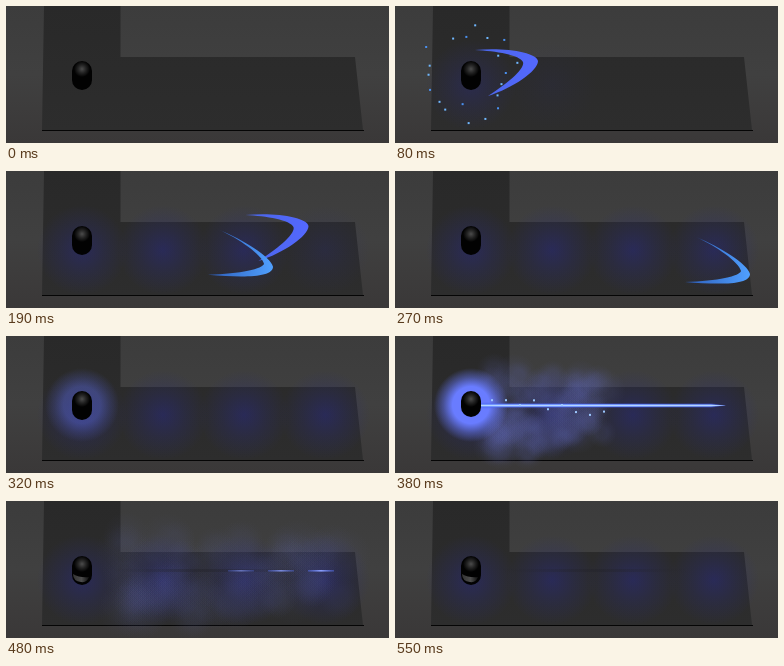
An HTML page with a canvas that plays this animation: 383x137 px, repeating every 690 ms.

```html
<!DOCTYPE html>
<html>
<head>
<meta charset="utf-8">
<style>
html, body { margin: 0; height: 100%; overflow: hidden; background: #3c3c3c; }
canvas { display: block; }
</style>
</head>
<body>
<canvas id="stage" width="383" height="137"></canvas>
<script>
const ctx = document.getElementById('stage').getContext('2d');
const LOOP = 690, BEAM_START = 350, BEAM_PEAK = 380, BEAM_END = 530;
const clamp = v => Math.max(0, Math.min(1, v));
const rand = n => { const v = Math.sin(n * 127.1 + 3.7) * 43758.5453; return v - Math.floor(v); };

// Poses are held: 30 and 50 ms in turn at first, then 50 ms each during the beam.
function hold(t) {
  if (t < BEAM_START) return t - t % 80 + (t % 80 < 30 ? 0 : 30);
  const step = BEAM_PEAK + 50 * Math.floor((t - BEAM_PEAK) / 50);
  return Math.max(BEAM_START, Math.min(BEAM_END, step));
}

function linear(x0, y0, x1, y1, colors) {
  const g = ctx.createLinearGradient(x0, y0, x1, y1);
  colors.forEach((c, i) => g.addColorStop(i / (colors.length - 1), c));
  return g;
}

function glow(x, y, r, rgb, alpha, core = 0) {
  const g = ctx.createRadialGradient(x, y, 0, x, y, r);
  g.addColorStop(0, `rgba(${rgb},${alpha})`);
  g.addColorStop(core, `rgba(${rgb},${alpha})`);
  g.addColorStop((1 + core) / 2, `rgba(${rgb},${alpha * 0.45})`);
  g.addColorStop(1, `rgba(${rgb},0)`);
  ctx.fillStyle = g;
  ctx.fillRect(x - r, y - r, 2 * r, 2 * r);
}

function room() {
  ctx.fillStyle = linear(0, 0, 0, 137, ['#3c3c3c', '#404040', '#3a3838']);
  ctx.fillRect(0, 0, 383, 137);
  ctx.fillStyle = linear(0, 0, 0, 124, ['#292929', '#2b2b2b', '#2d2d2d']);
  ctx.fill(new Path2D('M38 0H114.5V51H349L357 124H36Z'));
  ctx.fillStyle = '#050505';
  ctx.fillRect(36, 124, 322, 1);
}

function lamps(t) {
  for (let i = 0; i < 4; i++) {
    const on = clamp((t - 20 - i * 45) / 80);
    if (on) glow(76 + i * 81, 79, 45, '40,42,135', 0.48 * on);
  }
}

const RISING = new Path2D('M-63-11C-35-14-1-9 0 0C0 10-25 27-50 35C-27 20-13 7-15 1C-18-6-42-10-63-11Z');
const FALLING = new Path2D('M-54-37C-30-27-2-10 0 0C0 11-30 11-65 8C-32 7-10 2-9-3C-11-12-34-28-54-37Z');

function blade(path, x, y, colors) {
  ctx.save();
  ctx.translate(x, y);
  ctx.fillStyle = linear(-60, 0, 0, 0, colors);
  ctx.fill(path);
  ctx.restore();
}

function blades(t) {
  if (t >= 30 && t < 240) blade(RISING, 143 + (t - 80) * 1.45, 55, ['#4a66e8', '#5468ff']);
  if (t >= 110 && t < 320) blade(FALLING, 234 + (t - 160) * 1.1, 93 + (t - 160) * 0.09, ['#2f62c0', '#50a0ff']);
}

function sparks(t) {
  if (t < 30 || t > 160) return;
  const u = t - 30, pull = 1.2 - 0.00266 * u - 0.0000269 * u * u;
  for (let i = 0; i < 20; i++) {
    const angle = i * 2.4, r = (32 + 20 * rand(i)) * pull;
    ctx.fillStyle = i % 3 ? '#70b8ff' : '#4a90f0';
    ctx.fillRect(75 + r * Math.cos(angle), 66 + r * Math.sin(angle), 2, 2);
  }
}

function smoke(t) {
  if (t < BEAM_START || t >= BEAM_END) return;
  const age = (t - BEAM_PEAK) / 100, alpha = 0.15 * clamp(1 - 0.6 * Math.abs(age));
  for (let i = 0; i < 70; i++) {
    const a = rand(i) ** 1.4, r = 12 + 12 * rand(i + 140);
    const x = 98 + a * 112 + age * (20 + 110 * a);
    const y = 76 + (rand(i + 70) - 0.5) * (88 - 24 * a);
    glow(x, y, r + 6 * clamp(age), '88,95,168', alpha, 0.4);
  }
}

function flare(t) {
  const power = t < BEAM_PEAK ? (t - 290) / 90 : 1 - (t - BEAM_PEAK) / 90;
  if (power > 0) glow(76, 69, 37, '105,124,255', power, 0.5);
}

function streak(x0, x1, half, color) {
  ctx.fillStyle = color;
  ctx.beginPath();
  ctx.moveTo(x0, 69.5 - half);
  ctx.lineTo(x1 - 15, 69.5 - half * 0.8);
  ctx.lineTo(x1, 69.5);
  ctx.lineTo(x1 - 15, 69.5 + half * 0.8);
  ctx.lineTo(x0, 69.5 + half);
  ctx.fill();
}

function beam(t) {
  if (t < BEAM_START) return;
  if (t >= 480) {
    ctx.fillStyle = linear(105, 0, 295, 0, ['#22222a00', '#22222a70', '#22222a00']);
    ctx.fillRect(105, 68, 190, 3);
  }
  if (t >= BEAM_END) return;
  if (t >= 480) {
    for (let i = 0; i < 3; i++) {
      const x = 222 + 40 * i;
      ctx.globalAlpha = 0.6 + 0.2 * i;
      ctx.fillStyle = linear(x, 0, x + 26, 0, ['#5068e080', '#8ca0ff', '#5068e080']);
      ctx.fillRect(x, 69, 26, 1.6);
    }
    ctx.globalAlpha = 1;
    return;
  }
  const half = t > BEAM_PEAK ? 1 : 1.7, end = 331 - 3 * Math.max(0, BEAM_PEAK - t);
  streak(84, end, half + 1, '#3c52e055');
  streak(84, end, half, '#5c80ff');
  streak(84, end, half / 2, '#b4d4ff');
  ctx.fillStyle = '#9cc8ff';
  for (let i = 0; i < 9; i++) {
    ctx.fillRect(96 + i * 14 + (t - BEAM_PEAK) * 0.3, 63 + 15 * rand(i + 5), 2, 2);
  }
}

function capsule(t) {
  const firing = t >= BEAM_START && t <= BEAM_PEAK;
  ctx.fillStyle = '#020202';
  ctx.beginPath();
  ctx.roundRect(66, 55, 20, firing ? 26 : 29, 10);
  ctx.fill();
  glow(76, 63, 8, '115,115,115', 0.65);
  if (t > BEAM_PEAK) {
    ctx.fillStyle = linear(67, 0, 84, 0, ['#333', '#4c4c4c', '#080808']);
    ctx.fill(new Path2D('M67 73Q74 77 83 76Q81 82 75 81Q67 80 67 73Z'));
  }
}

function tick() {
  const t = hold(performance.now() % LOOP);
  for (const layer of [room, lamps, smoke, flare, beam, blades, sparks, capsule]) layer(t);
  requestAnimationFrame(tick);
}
tick();
</script>
</body>
</html>
```
